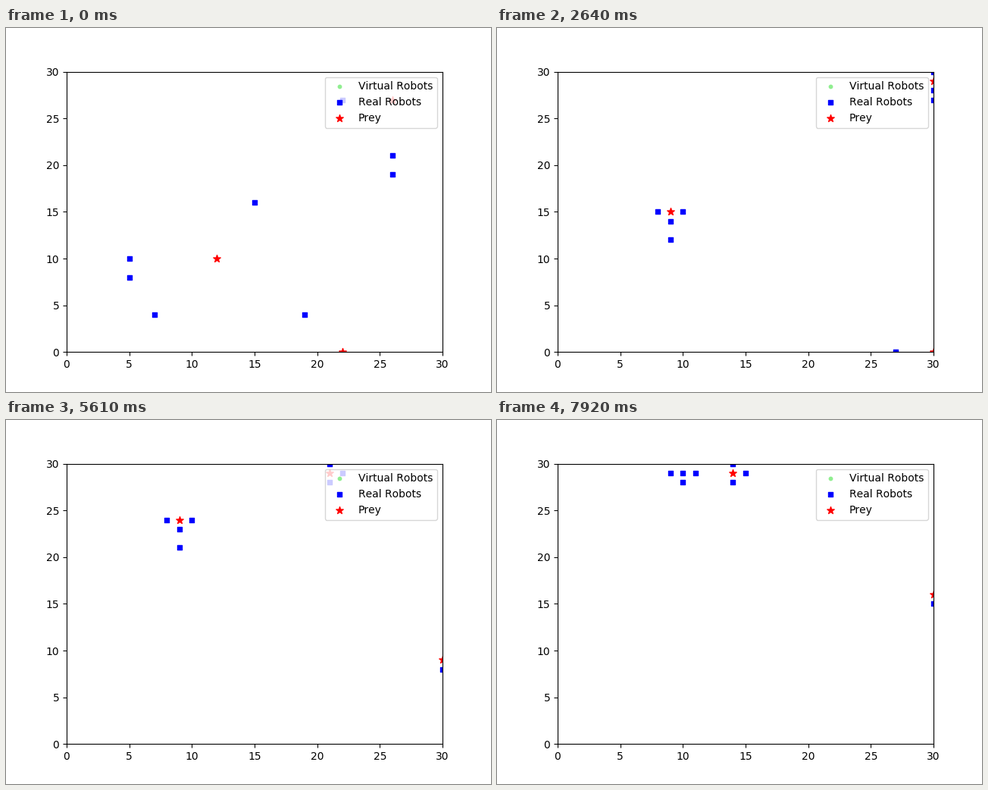
Recreate the animation shown at these times as a matplotlib script. Size 640 by 480 pixels, loop 8000 ms.

```python
import numpy as np
import matplotlib.pyplot as plt
from matplotlib.animation import FuncAnimation

LOOP_MS = 8000
STEP_MS = 330
TICK_MS = 40
SIZE = 30

UP, RIGHT, DOWN, LEFT = (0, 1), (1, 0), (0, -1), (-1, 0)

# Starting cells; robots move in this order, prey also have a heading.
ROBOTS = [(5, 8), (5, 10), (7, 4), (15, 16), (19, 4), (26, 19), (26, 21), (22, 27)]
PREY = [((12, 10), LEFT), ((26, 27), RIGHT), ((22, 0), RIGHT)]


def shift(cell, move):
    return cell[0] + move[0], cell[1] + move[1]


def first_free(cell, moves, taken):
    """The first move that stays on the field and hits nobody."""
    for move in moves:
        new = shift(cell, move)
        if new not in taken and 0 <= min(new) and max(new) <= SIZE:
            return move
    return None


def gap(a, b):
    return (a[0] - b[0]) ** 2 + (a[1] - b[1]) ** 2


def flee(prey, robots):
    """Prey run straight on, turn when blocked, and vanish when trapped."""
    alive = []
    for cell, heading in prey:
        move = first_free(cell, (heading, UP, RIGHT, DOWN, LEFT), robots)
        if move:
            alive.append((shift(cell, move), move))
    return alive


def chase(robots, prey):
    """Robots step towards the nearest prey and slide around obstacles."""
    targets = [cell for cell, _ in prey]
    robots = list(robots)
    for i, cell in enumerate(robots):
        goal = min(targets, key=lambda t: gap(t, cell))
        if gap(goal, cell) == 1:
            continue
        dx, dy = (int(np.sign(g - c)) for g, c in zip(goal, cell))
        moves = (dx, dy), (dx, 0), (0, dy), (dx or 1, dy or 1)
        robots[i] = shift(cell, first_free(cell, moves, robots + targets) or (0, 0))
    return robots


def simulate(steps):
    robots, prey = ROBOTS, PREY
    history = []
    for _ in range(steps):
        history.append((robots, [cell for cell, _ in prey]))
        prey = flee(prey, robots)
        robots = chase(robots, prey)
    return history


history = simulate(LOOP_MS // STEP_MS + 1)

plt.rcParams["text.kerning_factor"] = 6
fig, ax = plt.subplots(figsize=(6.4, 4.8), dpi=100)
ax.set_xlim(0, SIZE)
ax.set_ylim(0, SIZE)

ax.scatter([], [], s=10, c="lightgreen", marker="o", label="Virtual Robots")
robot_marks = ax.scatter([], [], s=20, c="blue", marker="s", label="Real Robots")
prey_marks = ax.scatter([], [], s=50, c="red", marker="*", label="Prey")
ax.legend(loc="upper right")


def update(frame):
    step = int((frame + 0.5) * TICK_MS // STEP_MS)
    robots, prey = history[step]
    robot_marks.set_offsets(robots)
    prey_marks.set_offsets(prey)
    return robot_marks, prey_marks


anim = FuncAnimation(fig, update, frames=LOOP_MS // TICK_MS,
                     interval=TICK_MS, repeat=True, repeat_delay=0)
plt.show()
```
